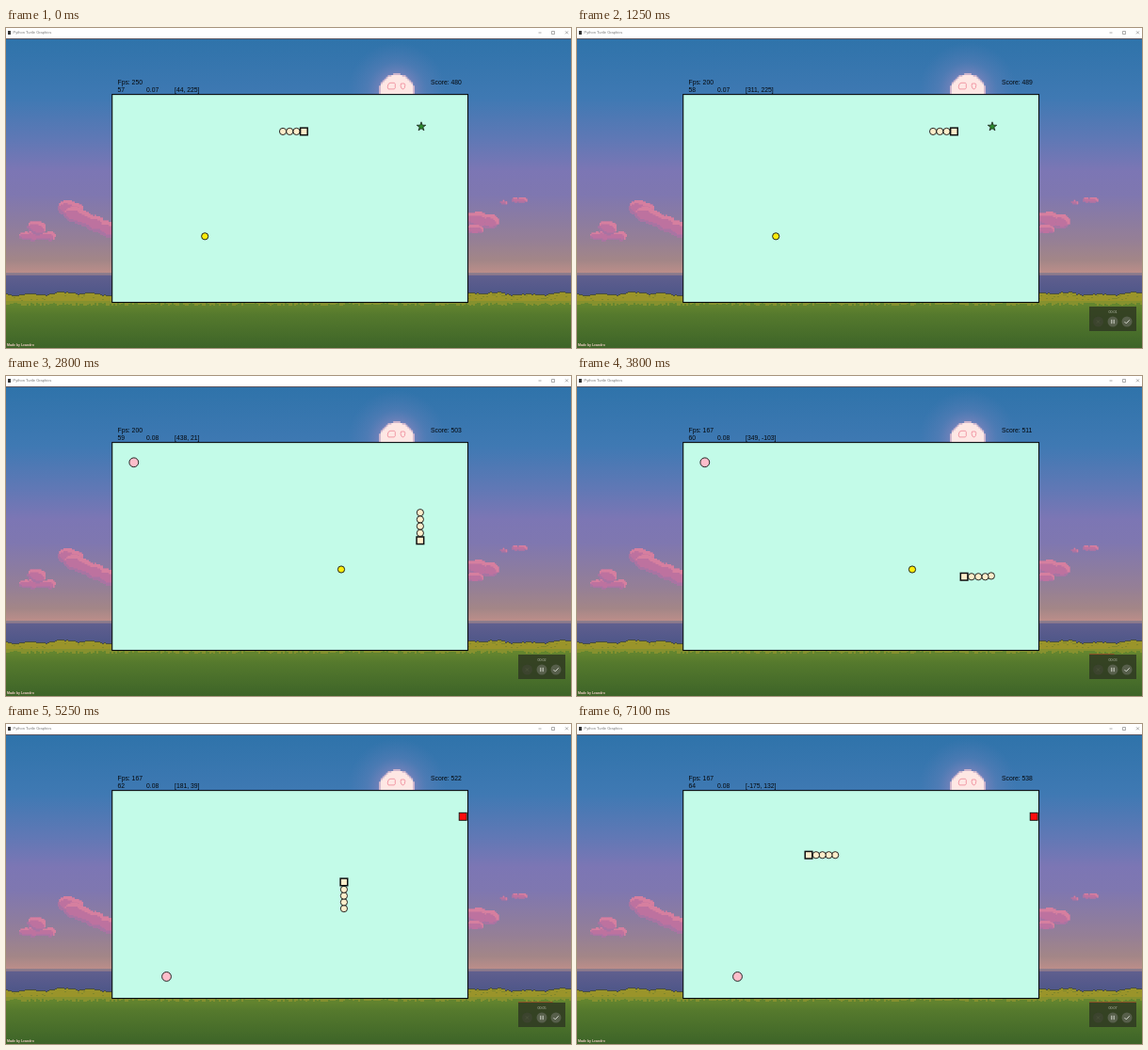
Write an HTML page that moves like this. It is 600x340 px and loops after 7.15 s.

```html
<!DOCTYPE html>
<html lang="en">
<head>
<meta charset="utf-8">
<title>Snake</title>
<style>
  html, body { margin: 0; width: 100%; height: 100%; overflow: hidden; background: #3d6428; }
  svg { display: block; width: 600px; height: 340px; }
  text { font-family: "Liberation Sans", Arial, sans-serif; white-space: pre; }
  .hud { font-size: 6.8px; fill: #05080c; }
  .piece { stroke: #111; stroke-width: .9; }
  .head { stroke-width: 1.5; }
</style>
</head>
<body>
<svg viewBox="0 0 600 340" xmlns="http://www.w3.org/2000/svg">
  <defs>
    <linearGradient id="sky" x1="0" y1="12" x2="0" y2="262" gradientUnits="userSpaceOnUse">
      <stop offset="0" stop-color="#2f73aa"/>
      <stop offset=".25" stop-color="#3f79b3"/>
      <stop offset=".43" stop-color="#6078b5"/>
      <stop offset=".56" stop-color="#7c76b4"/>
      <stop offset=".66" stop-color="#7f77b0"/>
      <stop offset=".85" stop-color="#957f96"/>
      <stop offset=".94" stop-color="#a38687"/>
      <stop offset="1" stop-color="#bf8f8a"/>
    </linearGradient>
    <linearGradient id="sea" x1="0" y1="0" x2="0" y2="1">
      <stop offset="0" stop-color="#605f8e"/>
      <stop offset="1" stop-color="#4a5488"/>
    </linearGradient>
    <linearGradient id="grass" x1="0" y1="0" x2="0" y2="1">
      <stop offset="0" stop-color="#69892f"/>
      <stop offset=".3" stop-color="#55792d"/>
      <stop offset="1" stop-color="#3d6428"/>
    </linearGradient>
    <radialGradient id="glow">
      <stop offset=".35" stop-color="#9288c0" stop-opacity=".6"/>
      <stop offset=".6" stop-color="#6f82bb" stop-opacity=".35"/>
      <stop offset="1" stop-color="#5f7fb8" stop-opacity="0"/>
    </radialGradient>
  </defs>

  <rect y="10" width="600" height="253" fill="url(#sky)"/>
  <circle cx="415" cy="67" r="52" fill="url(#glow)"/>
  <rect y="260" width="600" height="2.5" fill="#8d7c8c"/>
  <rect y="262.5" width="600" height="26" fill="url(#sea)"/>
  <rect y="290" width="600" height="50" fill="url(#grass)"/>
  <g id="scenery"></g>

  <rect width="600" height="11" fill="#fff"/>
  <rect y="11" width="600" height="1" fill="#5b5560"/>
  <rect x="2" y="3" width="3" height="4" fill="#333"/>
  <text x="7.5" y="6.4" font-size="4" fill="#777">Python Turtle Graphics</text>
  <path d="M565.5 5h3M579.5 3.5h3v3h-3zM594 3.3l3 3M597 3.3l-3 3" fill="none" stroke="#777" stroke-width=".6"/>

  <path d="M406 59.5l2-1.2h4.5l.8 1.2v4.2l-1 1.2h-6.3l-.8-2zM419.5 59h3.6l.7 1.5-.5 3-1.5 1.6-1.8-1-.9-2.6z"
        fill="none" stroke="#f0919f" stroke-width=".9"/>

  <rect x="112.7" y="70.6" width="377.8" height="220.9" fill="#c3fbe8" stroke="#080c10" stroke-width="1.1"/>
  <g class="hud">
    <text id="fps" x="118.5" y="60.1"></text>
    <text id="clock" x="118.5" y="67.6"></text>
    <text id="delay" x="149" y="67.6"></text>
    <text id="coords" x="179" y="67.6"></text>
    <text id="score" x="451" y="60.1"></text>
  </g>
  <text x="1" y="338" font-size="3.5" font-weight="bold" fill="#f4cfc9">Made by Leandro</text>

  <g class="piece">
    <path id="star" fill="#2b8a2b" stroke-width=".7"/>
    <circle id="yellow" r="3.6" fill="#fcec0c"/>
    <circle id="pink" r="4.9" fill="#fdbecb"/>
    <rect id="red" x="481.2" y="94.3" width="8" height="8" fill="#fb0d0d"/>
  </g>
  <g id="snake" class="piece" fill="#ffeecb"></g>

  <g id="recorder">
    <rect x="544" y="296" width="50" height="26" fill="#2f3822" opacity=".84"/>
    <rect id="bar" x="544" y="295" height="1" fill="#8a5226"/>
    <text id="timer" x="569" y="302.8" font-size="3.7" fill="#b9bfae" text-anchor="middle"></text>
    <circle cx="553.5" cy="312" r="5.5" fill="#3c442e"/>
    <path d="M551.8 310.3l3.4 3.4m0-3.4l-3.4 3.4" stroke="#515a42" stroke-width=".6"/>
    <g fill="#575f4b"><circle cx="569" cy="312" r="5.5"/><circle cx="584" cy="312" r="5.5"/></g>
    <path d="M567.8 309.8v4.4M570.2 309.8v4.4M581.5 312.1l1.8 1.8 3.4-3.6" fill="none" stroke="#d3d6cc"/>
  </g>
</svg>

<script>
const LOOP = 7150, TICK = 50;
const STAR_EATEN = 1850, FOOD_EATEN = 4600;
const $ = id => document.getElementById(id);

function add(parent, tag, attrs) {
  const el = document.createElementNS("http://www.w3.org/2000/svg", tag);
  for (const k in attrs) el.setAttribute(k, attrs[k]);
  parent.appendChild(el);
  return el;
}

let seed = 11;
const rnd = () => (seed = (seed * 16807) % 2147483647) / 2147483647;
const paint = (d, fill) => add($("scenery"), "path", { d, fill });
const box = (x, y, w, h) => `M${x} ${y}h${w}v${h}h${-w}z`;

// Fill the square cells around a centre whose midpoint passes the test
function pixels(cx, cy, reach, size, fill, test) {
  let d = "";
  for (let y = cy - reach; y < cy + reach; y += size)
    for (let x = cx - reach; x < cx + reach; x += size)
      if (test(x + size / 2, y + size / 2)) d += box(x, y, size, size);
  paint(d, fill);
}

// Puffs of varied size strung along a line, lit from above
function cloud(xa, ya, xb, yb, r) {
  const count = Math.ceil(Math.hypot(xb - xa, yb - ya) / r * 1.5) + 1, puffs = [];
  for (let i = 0; i < count; i++) {
    const k = i / count + .5 / count;
    puffs.push([xa + (xb - xa) * k, ya + (yb - ya) * k, r * (.8 + .4 * rnd())]);
  }
  const inside = (x, y) => puffs.some(([px, py, pr]) => Math.hypot((x - px) / 1.2, y - py) < pr);
  const fill = (color, test) =>
    pixels((xa + xb) / 2, (ya + yb) / 2, Math.abs(xb - xa) / 2 + r * 2, 1.5, color, (x, y) => inside(x, y) && test(x, y));
  fill("#bd729f", () => true);
  fill("#a874a3", (x, y) => !inside(x - 1, y + r / 3));
  fill("#d67f9f", (x, y) => !inside(x + 2, y - r / 2));
}

cloud(17, 221, 48, 221, 4.5);
cloud(29, 211, 35, 213, 7);
cloud(64, 191, 76, 193, 7.5);
cloud(70, 197, 112, 215, 7.5);
cloud(492, 202, 516, 206, 7.5);
cloud(494, 214, 503, 214, 4);
cloud(540, 183, 552, 183, 2.2);
cloud(526, 185, 531, 185, 1.4);

const disc = (r, fill) => pixels(415, 67, 19, 1.9, fill, (x, y) => Math.hypot(x - 415, y - 67.5) < r);
disc(19, "#cdb4cc");
disc(17.8, "#fee7e4");

// Hedge along the shore
let edge = "", leaves = "", fringe = "", shade = "";
for (let x = 0; x < 600; x += 2) {
  const top = 283 + Math.round(Math.sin(x * .19) + Math.sin(x * .071) + rnd() - .5);
  edge += box(x, top - 1, 2, 1);
  leaves += box(x, top, 2, 292 - top);
  fringe += box(x, 290, 2, 2 + Math.floor(rnd() * 4));
  if (rnd() < .35) shade += box(x, top + 1 + Math.floor(rnd() * 5), 2, 1);
}
paint(edge, "#4a4f3c");
paint(leaves, "#9a942a");
paint(fringe, "#86912e");
paint(shade, "#7f872b");

let star = "";
for (let i = 0; i < 10; i++) {
  const r = i % 2 ? 2 : 5, a = (i / 5 - .5) * Math.PI;
  star += `${i ? "L" : "M"}${441 + r * Math.cos(a)} ${104.8 + r * Math.sin(a)}`;
}
$("star").setAttribute("d", star + "z");

// Corners of the snake's way, in game units
const corners = [[44, 225], [438, 225], [438, -103], [181, -103], [181, 132], [-400, 132]];
const toStage = ([x, y]) => [301.9 + x * .315, 180.8 - y * .315];

// Steady pace, quicker towards the end
const travelled = t => .2135 * t + .0295 * Math.max(0, t - 5250);

function along(dist) {
  let i = 0, len;
  for (; ; i++) {
    const [ax, ay] = corners[i], [bx, by] = corners[i + 1];
    len = Math.hypot(bx - ax, by - ay);
    if (dist <= len) return [ax + (bx - ax) * dist / len, ay + (by - ay) * dist / len];
    dist -= len;
  }
}

function framesPerSecond(s) {
  const frameMs = 6 - 2 * Math.exp(-s / 2.4) - .065 * s * Math.sin(1.2 * s);
  return Math.round(1000 / Math.round(frameMs));
}

const snake = $("snake");
const beads = [3, 2, 1, 0].map(n => ({ n, el: add(snake, "circle", { r: 3.6 }) }));
const head = add(snake, "rect", { width: 7.6, height: 7.6, class: "head" });

const show = (id, on) => { $(id).style.display = on ? "" : "none"; };
const place = (el, [x, y]) => { el.setAttribute("cx", x); el.setAttribute("cy", y); };
const write = (id, s) => { $(id).textContent = s; };

function draw(t) {
  const early = t < STAR_EATEN, late = t >= FOOD_EATEN;
  const s = t / 1000, dist = travelled(t), lead = dist + 2;

  const [hx, hy] = toStage(along(lead));
  head.setAttribute("x", hx - 3.8);
  head.setAttribute("y", hy - 3.8);
  const gap = late ? 21.5 : 23;
  for (const { n, el } of beads) {
    place(el, toStage(along(lead - 25 - gap * n)));
    el.style.display = n < 3 || !early ? "" : "none";
  }

  show("star", early);
  show("yellow", !late);
  show("pink", !early);
  show("red", late);
  place($("yellow"), early ? [211.2, 221.3] : [356, 205.5]);
  place($("pink"), late ? [170.5, 268.4] : [135.8, 91.8]);

  write("fps", "Fps: " + framesPerSecond(s));
  write("clock", Math.floor(57.1 + s));
  write("delay", early ? "0.07" : "0.08");
  write("coords", `[${along(dist).map(Math.round).join(", ")}]`);
  write("score", "Score: " + Math.floor(480 + .0359 * dist + (early ? 0 : 2)));

  $("recorder").style.opacity = Math.min(1, t / 250);
  write("timer", "00:0" + Math.floor(s));
  $("bar").setAttribute("width", t < 3000 ? 0 : 50 * t / LOOP);
}

const start = performance.now();
function frame() {
  const t = (performance.now() - start) % LOOP;
  draw(Math.floor(t / TICK) * TICK);
  requestAnimationFrame(frame);
}
draw(0);
requestAnimationFrame(frame);
</script>
</body>
</html>
```
